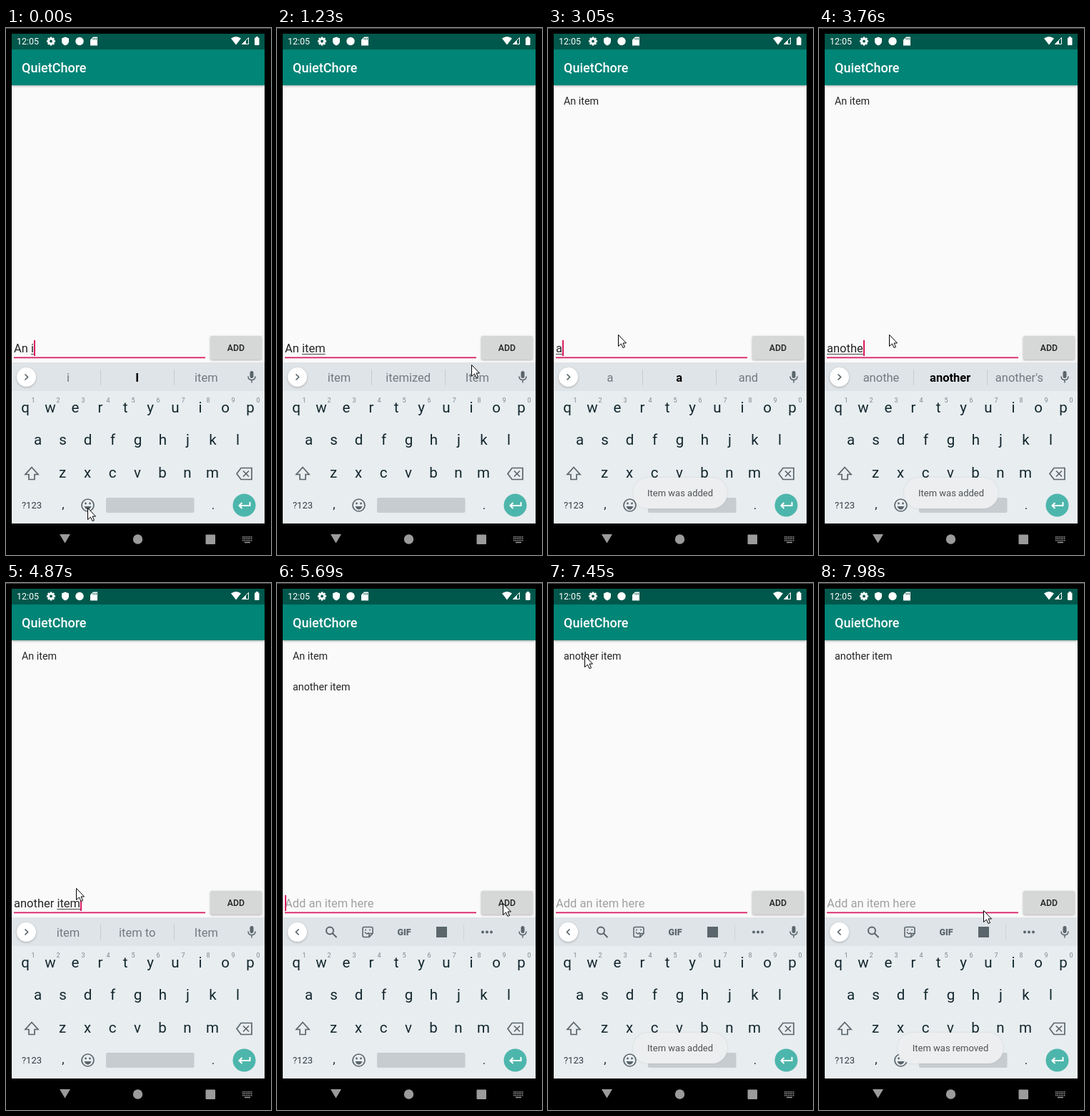
An HTML page with a canvas that plays this animation: 371x736 px, repeating every 8000 ms.

```html
<!DOCTYPE html>
<html lang="en">
<head>
<meta charset="utf-8">
<style>
html, body { margin: 0; width: 100%; height: 100%; overflow: hidden; background: #000; }
canvas { display: block; }
</style>
</head>
<body>
<canvas id="stage" width="371" height="736"></canvas>
<script>
const ctx = document.getElementById('stage').getContext('2d');
const LOOP = 8000;
const INK = '#12272d', ICON = '#5a666b', PINK = '#d81b60';

// [time, typed text, suggestions]; * marks the bold suggestion
const typing = [
  [0, 'An i', 'i|*I|item'],
  [150, 'An it', 'it|*It|item'],
  [285, 'An ite', 'ite|*item|items'],
  [420, 'An item', 'item|itemized|Item'],
  [1653, '', ''],
  [3050, 'a', 'a|*a|and'],
  [3190, 'an', 'an|and|any'],
  [3330, 'ano', 'ano|*another|anon'],
  [3480, 'anot', 'anot|*another|anorak'],
  [3620, 'anoth', 'anoth|*another|another\'s'],
  [3760, 'anothe', 'anothe|*another|another\'s'],
  [3890, 'another', 'another|another\'s|Another'],
  [4040, 'another ', 'one|day|way'],
  [4170, 'another i', 'i|*I|item'],
  [4305, 'another ite', 'ite|*item|items'],
  [4440, 'another item', 'item|item to|Item'],
  [5690, '', '']
];
const lists = [[0], [1653, 'An item'], [5690, 'An item', 'another item'], [7330, 'another item']];
const caretOff = [[920, 1420], [2220, 2640], [4940, 5420], [6083, 6630], [7050, 7460], [7940, 8000]];
const presses = [[1517, 1653], [5560, 5690]];
const toasts = [
  [1890, 4150, 'Item was added', 119, 132],
  [5780, 7760, 'Item was added', 119, 132],
  [7800, 9000, 'Item was removed', 110, 148]
];
const pointer = [
  [0, 114.5, 670], [740, 114.5, 670], [1230, 272.5, 470], [1380, 316, 447], [1653, 316, 447],
  [1940, 110.5, 467], [2360, 98.5, 428], [4760, 98.5, 428], [4870, 98.5, 426], [5420, 316, 447],
  [5690, 316, 447], [5830, 225, 330], [6350, 51.5, 101], [7400, 51.5, 101], [7980, 230.5, 457], [8000, 230.5, 457]
];
const ticks = [[830, 1230, 4], [1380, 1790, 4], [1940, 2360, 4], [4870, 5830, 8], [5950, 6350, 4], [7330, 7980, 6]]
  .flatMap(([a, b, n]) => Array.from({ length: n }, (_, i) => a + (b - a) * i / (n - 1)));

const latest = (rows, t) => rows.filter(r => r[0] <= t).pop();
const within = (spans, t) => spans.some(([a, b]) => t >= a && t < b);

function rect(x, y, w, h, color, r = 0) {
  ctx.fillStyle = color;
  ctx.beginPath();
  ctx.roundRect(x, y, w, h, r);
  ctx.fill();
}
function disc(x, y, r, color) {
  ctx.fillStyle = color;
  ctx.beginPath();
  ctx.arc(x, y, r, 0, 7);
  ctx.fill();
}
function fill(d, color, x = 0, y = 0) {
  ctx.save();
  ctx.translate(x, y);
  ctx.fillStyle = color;
  ctx.fill(new Path2D(d));
  ctx.restore();
}
function line(d, color, x = 0, y = 0, width = 1.7) {
  ctx.save();
  ctx.translate(x, y);
  ctx.strokeStyle = color;
  ctx.lineWidth = width;
  ctx.stroke(new Path2D(d));
  ctx.restore();
}
function text(s, x, y, size, color, align = 'left', weight = 400) {
  ctx.font = `${weight} ${size}px Roboto, sans-serif`;
  ctx.textAlign = align;
  ctx.fillStyle = color;
  ctx.fillText(s, x, y);
  return ctx.measureText(s).width;
}

function statusBar() {
  rect(8, 8, 354, 22, '#00574b');
  text('12:05', 15, 23, 12.5, '#fff');
  for (let i = 0; i < 8; i++) {
    ctx.save();
    ctx.translate(63, 18.5);
    ctx.rotate(i * Math.PI / 4);
    rect(-1.4, -6, 2.8, 3, '#fff');
    ctx.restore();
  }
  disc(63, 18.5, 4.5, '#fff');
  disc(63, 18.5, 1.9, '#00574b');
  fill('M0-6 5-4V0C5 3 3 5 0 6-3 5-5 3-5 0V-4Z', '#fff', 83, 18.5);
  disc(103, 18.5, 5.7, '#fff');
  fill('M-1-6H5V6H-5V-2Z', '#fff', 123, 18.5);
  for (const x of [-1.5, .8, 3.1]) rect(123 + x, 14, 1, 2.5, '#00574b');
  fill('M-7-3Q0-8 7-3L0 6Z', '#fff', 322, 17.5);
  line('M.5 9.5H9.5V.5Z', '#fff', 330, 13, 1);
  fill('M0 10H6V4Z', '#fff', 330, 13);
  rect(348, 13.5, 6.5, 10.5, '#fff', 1);
  rect(349.8, 12, 3, 2, '#fff');
}

function appBar() {
  ctx.save();
  ctx.shadowColor = 'rgba(0,0,0,.35)';
  ctx.shadowBlur = 3;
  ctx.shadowOffsetY = 1;
  rect(8, 30, 354, 50, '#008577');
  ctx.restore();
  text('QuietChore', 22, 62, 18, '#fff', 'left', 500);
}

function inputRow(t, typed) {
  let end = 11;
  if (typed) {
    end += text(typed, 11, 453, 16.5, '#252525');
    const word = typed.split(' ').pop();
    const width = ctx.measureText(word).width;
    rect(end - width, 455, width, 1, '#444');
  } else {
    text('Add an item here', 11, 453, 16.5, '#a0a0a0');
  }
  rect(11, 459.5, 268, 1.7, PINK);
  if (!within(caretOff, t)) rect(Math.round(end), 436, 2, 22, PINK);

  ctx.save();
  ctx.shadowColor = 'rgba(0,0,0,.3)';
  ctx.shadowBlur = 3;
  ctx.shadowOffsetY = 1;
  rect(286, 430, 72, 33, within(presses, t) ? '#c2c3c3' : '#d6d7d7', 2);
  ctx.restore();
  text('ADD', 322, 451, 12.3, '#202020', 'center', 500);
}

function toolStrip(suggestions) {
  rect(8, 467, 354, 40, '#dfe4e8');
  ctx.save();
  ctx.shadowColor = 'rgba(0,0,0,.25)';
  ctx.shadowBlur = 3;
  ctx.shadowOffsetY = 1;
  disc(28.5, 487.5, 13.5, '#fff');
  ctx.restore();
  line(suggestions ? 'M-2-4 2 0-2 4' : 'M2-4-2 0 2 4', ICON, 28.5, 487.5);

  if (suggestions) {
    suggestions.split('|').forEach((s, i) => {
      const bold = s[0] === '*';
      text(s.replace('*', ''), 87 + i * 96.7, 494, 16.5, bold ? '#000' : '#717a7f', 'center', bold ? 700 : 400);
    });
    for (const x of [132, 235]) rect(x, 477, 1, 22, '#c5ccd0');
  } else {
    line('M3-2A5 5 0 1 1-7-2 5 5 0 1 1 3-2ZM1.5 1.5 7.5 7.5', ICON, 76, 487.5, 2);
    line('M-5-7H5Q7-7 7-5V2L2 7H-5Q-7 7-7 5V-5Q-7-7-5-7ZM2 7V4Q2 2 4 2H7M-4 0Q-2 4 2 1M-3-4V-2M3-4V-2', ICON, 127, 487.5, 1.6);
    text('GIF', 178, 492, 12.5, ICON, 'center', 900);
    rect(223, 480, 15, 15, ICON);
    rect(261, 477, 1, 22, '#cdd3d7');
    for (const x of [288, 294, 300]) disc(x, 487.5, 2, ICON);
  }
  rect(341.5, 479, 5, 10, ICON, 2.5);
  line('M-5-1Q-5 4 0 4T5-1M0 4V8', ICON, 344, 487.5, 1.5);
}

function keyboard() {
  rect(8, 507, 354, 185, '#e8edf0');
  [['qwertyuiop', 27, 537], ['asdfghjkl', 44.5, 582], ['zxcvbnm', 79, 628]].forEach(([row, x0, y], r) =>
    [...row].forEach((key, i) => {
      const x = x0 + i * 35;
      text(key, x, y, 20.5, INK, 'center');
      if (!r) text((i + 1) % 10, x + 11, 523, 9, '#7d878b', 'center');
    }));
  line('M0-9 9 1H4V8H-4V1H-9Z', ICON, 36, 622.5);
  line('M-11 0-5-8H10V8H-5ZM-2-4 6 4M6-4-2 4', ICON, 334, 622.5);
  text('?123', 36, 671, 13, '#303e44', 'center');
  text(',', 80, 671, 17, INK, 'center');
  text('.', 290, 672, 17, INK, 'center');
  line('M8.5 0A8.5 8.5 0 1 1-8.5 0 8.5 8.5 0 1 1 8.5 0Z', ICON, 114.5, 666.5);
  fill('M-5 1.5H5Q3 6 0 6T-5 1.5Z', ICON, 114.5, 666.5);
  disc(111.5, 664, 1.4, ICON);
  disc(117.5, 664, 1.4, ICON);
  rect(140, 656, 123.5, 21, '#c7ccd0', 2);
  disc(333.5, 666.5, 16, '#4db6ac');
  line('M8-5V0H-7M-3-4-7 0-3 4', '#fff', 333.5, 667, 2);
}

function toast(t) {
  for (const [start, stop, label, x, w] of toasts) {
    const alpha = Math.min(1, (t - start) / 55, (stop - t) / 110);
    if (alpha <= 0) continue;
    ctx.save();
    ctx.globalAlpha = alpha;
    ctx.shadowColor = 'rgba(0,0,0,.1)';
    ctx.shadowBlur = 3;
    rect(x, 628, w, 43, '#eceef0', 21);
    ctx.shadowColor = 'transparent';
    text(label, x + w / 2, 654, 13, '#505355', 'center');
    ctx.restore();
  }
}

function navBar() {
  const gray = '#9b9b9b';
  fill('M75 707H90L82.5 719.5Z', gray);
  disc(184.5, 714, 6.7, gray);
  rect(279.5, 707.5, 13.5, 13.5, gray, 1);
  for (let r = 0; r < 3; r++)
    for (let c = 0; c < 6; c++) rect(331 + c * 2.4, 710 + r * 2.5, 1.5, 1.5, gray);
  rect(334, 717.7, 8, 1.5, gray);
}

function mouse(t) {
  const moment = ticks.filter(k => k <= t).pop() || 0;
  const i = Math.max(1, pointer.findIndex(p => p[0] >= moment));
  const [t0, x0, y0] = pointer[i - 1], [t1, x1, y1] = pointer[i];
  const k = (moment - t0) / (t1 - t0);
  const x = Math.floor(x0 + (x1 - x0) * k) + .5, y = Math.floor(y0 + (y1 - y0) * k) + .5;
  const arrow = 'M0 0V16L4 12.5 6.5 18 9 17 6.6 11.5H11Z';
  fill(arrow, '#fff', x, y);
  line(arrow, '#000', x, y, 1);
}

function draw(t) {
  const [, typed, suggestions] = latest(typing, t);
  rect(0, 0, 371, 736, '#000');
  rect(0, 0, 371, 1, '#484848');
  rect(8, 8, 354, 684, '#fafafa');
  appBar();
  statusBar();
  latest(lists, t).slice(1).forEach((s, i) => text(s, 22, 107 + i * 43.3, 14.3, '#252525'));
  inputRow(t, typed);
  toolStrip(suggestions);
  keyboard();
  toast(t);
  navBar();
  mouse(t);
}

const begin = performance.now();
function loop() {
  draw((performance.now() - begin) % LOOP);
  requestAnimationFrame(loop);
}
loop();
</script>
</body>
</html>
```
